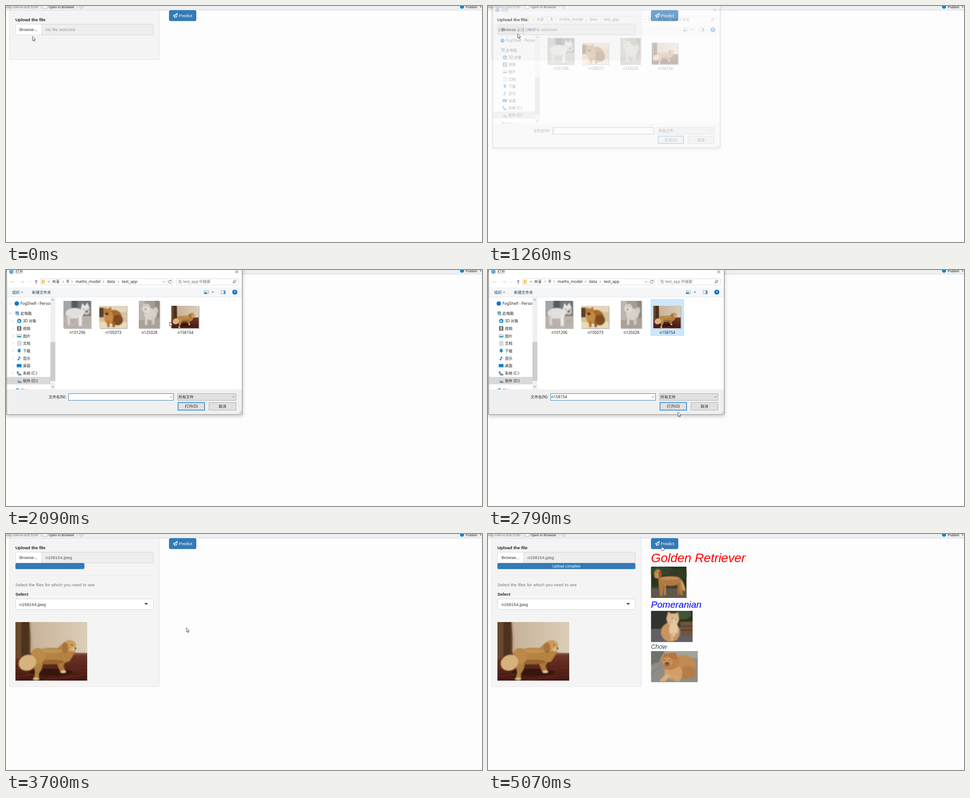
Recreate the animation shown at these times as an HTML page. Size 1061x528 px, loop 9.05 s.

```html
<!DOCTYPE html>
<html lang="en">
<head>
<meta charset="utf-8">
<title>Upload and predict</title>
<style>
html, body { margin: 0; width: 100%; height: 100%; overflow: hidden; background: #fdfdfd }
svg { display: block }
text { font: 9.73px "Liberation Sans", Arial, sans-serif; white-space: pre }
.tiny { font-size: 7.7px }
.bold { font-weight: bold }
#dialog text { font: 8.45px "Noto Sans", "Noto Sans CJK SC", "Noto Sans CJK", sans-serif }
#dialog .latin { font-size: 8.7px }
#frame { filter: drop-shadow(0 3px 4px rgba(0, 0, 0, .25)) }
</style>
</head>
<body>
<svg id="stage" width="1061" height="528" viewBox="0 0 1061 528"></svg>
<script>
const rect = (x, y, w, h, fill, more = '') =>
  `<rect x="${x}" y="${y}" width="${w}" height="${h}" fill="${fill}" ${more}/>`;
const oval = (x, y, rx, ry, fill, more = '') =>
  `<ellipse cx="${x}" cy="${y}" rx="${rx}" ry="${ry}" fill="${fill}" ${more}/>`;
const fillPath = (d, fill, more = '') => `<path d="${d}" fill="${fill}" ${more}/>`;
const line = (d, color = '#555', w = 1) =>
  `<path d="${d}" fill="none" stroke="${color}" stroke-width="${w}"/>`;
const text = (x, y, s, fill = '#333', more = '') =>
  `<text x="${x}" y="${y}" fill="${fill}" ${more}>${s}</text>`;
const group = (id, body) => `<g id="${id}">${body}</g>`;
const right = (x, y, c) => line(`M${x - 1.2} ${y - 2.5}l2.5 2.5-2.5 2.5`, c, .8);
const down = (x, y, c) => line(`M${x - 2.6} ${y - 1.3}l2.6 2.6 2.6-2.6`, c, .8);
const caret = (x, y, r, fill = '#333') => fillPath(`M${x - r} ${y - r / 2}h${2 * r}l${-r} ${r}z`, fill);
// The sharp copy below keeps the edges of the softened picture opaque
const photo = (x, y, w, h, vw, vh, body) =>
  `<svg x="${x}" y="${y}" width="${w}" height="${h}" viewBox="0 0 ${vw} ${vh}" preserveAspectRatio="none">
  ${body}<g filter="url(#soft)">${body}</g></svg>`;

// Simplified pictures
const retriever = rect(0, 0, 160, 131, 'url(#wall)') + rect(0, 0, 34, 84, '#6b492e') +
  rect(13, 0, 17, 85, '#4d301c') + fillPath('M32 0H36L40 70H36z', '#c0a78c') +
  fillPath('M0 84L36 68 160 69V131H0z', 'url(#floor)') +
  line('M0 104L160 84M0 122L160 101M60 131L160 117', '#6a2c21', 1.5) +
  rect(118, 69, 42, 5, '#7d4c36') + oval(80, 112, 48, 8, '#35140f') +
  fillPath('M38 84L64 84 58 106 52 116V129H41L44 112z', '#b08042') +
  fillPath('M88 82L117 78 107 98 112 112 101 114 95 99z', '#ad763a') +
  fillPath('M36 67Q60 55 94 58L108 45Q121 38 131 45L134 66 120 88Q84 98 51 92L35 83z', '#b48243') +
  oval(76, 65, 30, 5, '#c39150') + oval(80, 89, 28, 5, '#95652f') +
  oval(50, 76, 16, 18, '#bb8a49') + oval(27, 91, 20, 17, '#d6b27c', 'transform="rotate(-25 27 91)"') +
  oval(121, 53, 14, 13, '#cc9b5c') + oval(111, 58, 7, 12, '#a8733a') +
  oval(129, 61, 6, 5, '#dbb680') + oval(134, 59, 2, 2, '#30251e') + oval(126, 51, 1.4, 1.4, '#30251e') +
  oval(107, 111, 6, 3, '#e4c38e') + oval(46, 127, 7, 3, '#d9b67c');

const bulldog = rect(0, 0, 61, 61, '#73777a') + rect(0, 0, 17, 38, '#a4a6a5') + rect(19, 0, 13, 32, '#56585b') +
  fillPath('M0 34H61V61H0z', '#bbb3aa') + line('M0 55L30 38M18 61L60 43', '#a09a93') +
  oval(25, 28, 20, 12, '#dfe0df') + rect(9, 32, 6, 22, '#d6d5d2') + rect(34, 31, 7, 25, '#eae9e7') +
  fillPath('M39 18L42 5 48 12 53 4 58 15 57 28 42 30z', '#e6e5e2') + oval(52, 25, 7, 6, '#cdc5c0') +
  oval(52, 24, 2.5, 2, '#353535') + oval(45, 19, 1.2, 1.2, '#333') + oval(55, 19, 1.2, 1.2, '#333');
const pomThumb = rect(0, 0, 61, 50, '#d6c19a') + rect(0, 0, 61, 14, '#e2d7bd') + rect(0, 4, 10, 22, '#5b4026') +
  rect(0, 36, 61, 14, '#eadab7') + oval(33, 25, 17, 16, '#a9682b') + oval(41, 32, 12, 12, '#7d4c24') +
  fillPath('M9 14L12 3 18 7 26 2 29 16 24 24 13 24z', '#ba7832') + oval(21, 27, 10, 14, '#c58a44') +
  rect(17, 34, 6, 14, '#b77733') + rect(29, 36, 6, 12, '#9c6028') + oval(17, 18, 4, 3, '#50321f');
const samoyed = rect(0, 0, 46, 61, '#a49d94') + rect(0, 0, 13, 43, '#bbb5ac') + rect(36, 0, 10, 38, '#8d877f') +
  rect(0, 43, 46, 18, '#aaa198') + oval(26, 30, 14, 13, '#d8d3ca') + oval(17, 17, 9, 10, '#e2ddd4') +
  fillPath('M9 13L10 6 15 9 22 6 25 15z', '#d3ccc2') + rect(14, 32, 5, 22, '#dcd6cc') +
  rect(29, 34, 6, 19, '#d0cabf') + oval(15, 19, 2, 1.5, '#474340') + oval(38, 22, 5, 8, '#d3ccc0');

const standing = rect(0, 0, 79, 70, '#27341e') + oval(20, 10, 32, 10, '#35442a') + oval(61, 18, 22, 12, '#303b25') +
  rect(0, 44, 79, 9, '#404331') + rect(0, 49, 79, 21, '#5e584a') +
  fillPath('M65 27Q75 36 76 55L70 52 62 39z', '#cf9f68') +
  fillPath('M16 24L58 23Q68 27 67 39L71 64H66L59 41Q42 45 29 41L25 66H20L17 40z', '#b1783f') +
  oval(42, 26, 22, 4, '#c48d52') + rect(29, 39, 4, 25, '#bd8650') + rect(59, 38, 4, 25, '#a56b38') +
  oval(15, 16, 8, 10, '#bd8347') + oval(20, 18, 3.5, 8, '#94572a') + oval(12, 21, 4.5, 4.5, '#d0a06b') +
  oval(11, 21, 1.6, 1.3, '#2d2722');
const pomeranian = rect(0, 0, 92, 69, '#3b3b39') + rect(0, 37, 92, 32, '#626166') + rect(0, 0, 38, 40, '#30302e') +
  rect(63, 0, 29, 29, '#26341f') + oval(71, 8, 18, 11, '#435433') + fillPath('M64 24H92V55H68z', '#70543a') +
  line('M65 34H92M66 43H92', '#46362b', 2) + oval(43, 47, 21, 21, '#c9965f') +
  fillPath('M34 17L38 2 47 8 60 4 62 19 58 30 38 31z', '#d8b283') + oval(48, 19, 13, 13, '#dcb788') +
  oval(50, 41, 10, 16, '#e4c8a1') + rect(44, 49, 5, 17, '#dab486') + rect(53, 50, 5, 15, '#c9995f') +
  oval(54, 21, 5, 4, '#e9d5b8') + oval(55, 20, 1.8, 1.4, '#2e2925') + oval(48, 16, 1.2, 1.2, '#2e2925');
const chow = rect(0, 0, 104, 69, '#8e8d86') + rect(0, 0, 104, 16, '#a3a199') + fillPath('M0 0H30L17 24 0 31z', '#6e7267') +
  line('M0 48L27 32M24 24L0 57', '#7a7972') + oval(72, 32, 27, 23, '#c08a55') + oval(82, 48, 18, 14, '#b67b45') +
  oval(50, 47, 20, 16, '#d0a06c') + oval(43, 23, 20, 19, '#c08148') +
  fillPath('M27 13L29 4 37 7 49 3 57 6 59 19z', '#b5743a') + oval(37, 24, 11, 11, '#cc935a') +
  oval(36, 29, 6, 5, '#84603f') + oval(35, 26, 2.6, 1.8, '#292421') + oval(30, 20, 1.3, 1, '#292421') +
  oval(42, 20, 1.3, 1, '#292421') + fillPath('M33 51L44 54 31 67H18z', '#dcb07c') +
  fillPath('M54 53L69 55 64 67H51z', '#d5a168');

// Web page
const tiny = (x, s, fill = '#222') => text(x, 5, s, fill, 'class="tiny"');
const toolbar = rect(0, 0, 1061, 9, '#eceef1') + rect(0, 9, 1061, 1, '#d8dbdf') +
  tiny(0, 'http://demo.test:5290', '#777') + tiny(95, 'Open in Browser') + tiny(1025, 'Publish') +
  line('M77.5 0V6M158.5 0V6', '#c3c5c8') + rect(82.5, -3, 9, 8, '#fff', 'stroke="#9aa0a6" stroke-width=".8"') +
  oval(168, 2, 4.2, 4.2, '#e5e7e9', 'stroke="#bbbec2" stroke-width=".8"') + oval(168, 2, 1.5, 1.5, '#c5c8cc') +
  oval(1016.5, 1.5, 4.6, 4.6, '#1c7fc0') + caret(1058, 2.5, 2);

const box = (x, y, w, h, fill, edge, more = '') =>
  rect(x, y, w, h, fill, `rx="2.8" stroke="${edge}" stroke-width=".8" ${more}`);
const uploaded = line('M21 93H328.5', '#ebebeb') +
  text(21, 117.2, 'Select the files for which you need to see', '#777') +
  text(21, 138.2, 'Select', '#222', 'class="bold"') + box(21.3, 145.4, 307, 23.4, '#fff', '#ccc') +
  text(30, 160.5, 'n158154.jpeg') + caret(312.5, 156.5, 4) + photo(21, 197, 160, 131, 160, 131, retriever);

const italic = (y, size, s, fill) => text(363.3, y, s, fill, `style="font-size:${size}px;font-style:italic"`);
const results = italic(63, 27.9, 'Golden Retriever', '#f00') + photo(363.5, 73, 79, 70, 79, 70, standing) +
  italic(164.9, 20.9, 'Pomeranian', '#00f') + photo(363.5, 172, 92.5, 69.5, 92, 69, pomeranian) +
  italic(256.6, 13.9, 'Chow', '#2f4f4f') + photo(363.5, 262, 104, 69.5, 104, 69, chow);

const page = toolbar + box(7.4, 9.8, 334.8, 110.4, '#f4f4f4', '#e3e3e3', 'id="panel"') +
  text(21, 33.6, 'Upload the file', '#222', 'class="bold"') + box(21.3, 40.8, 307, 23.8, '#eee', '#ccc') +
  fillPath('M79.5 41.2H24a2.5 2.5 0 0 0-2.4 2.5V62a2.5 2.5 0 0 0 2.4 2.3H79.5z', '#fff', 'id="browse"') +
  line('M79.5 41V64.5', '#ccc', .8) + text(30, 56, 'Browse...') + text(88, 56, '', '#999', 'id="file"') +
  rect(21, 65, 0, 13.6, '#337ab7', 'id="bar" rx="2.8"') +
  text(174.8, 74.8, 'Upload complete', '#fff', 'id="done" text-anchor="middle" style="font-size:8.34px"') +
  group('uploaded', uploaded) + box(363.8, 9.8, 60, 23.4, '#337ab7', '#2e6da4', 'id="predict"') +
  line('M372.8 22L382 16.4 380.4 25.2 377.5 23.8 375.7 26.2 375.4 23.1zM375.4 23.1L382 16.4', '#fff', 1.1) +
  text(385, 24.8, 'Predict', '#fff') + group('results', results);

// File dialog
const latin = (x, y, s, fill = '#222', more = '') => text(x, y, s, fill, 'class="latin" ' + more);
const places = ['3D 对象', '视频', '图片', '文档', '下载', '音乐', '桌面', '系统 (C:)', '软件 (D:)'];
const rowY = i => 114 + i * 16.7;
const drive = y => fillPath(`M24 ${y}h7l3.5 2.5v2h-7z`, '#9b9fa3') + line(`M27 ${y + 4}h7`, '#444');
const icons = [
  y => fillPath(`M25 ${y - 3}l5-2 4 2v6l-4 2-5-2z`, '#1688d3') + fillPath(`M27 ${y - 1}l4-1v5l-4-1z`, '#bde9fb'),
  y => rect(25, y - 5, 9, 10, '#555') + rect(27.5, y - 4, 4, 8, '#b6c9d5'),
  y => rect(24.5, y - 3.5, 10, 7, '#e9f4fa', 'stroke="#999" stroke-width=".7"') + rect(25.5, y, 8, 3, '#4496bc'),
  y => rect(26, y - 4.5, 7.5, 9, '#fff', 'stroke="#8b9baa" stroke-width=".8"') +
    line(`M27.5 ${y - 2}h4.5m-4.5 2h4.5m-4.5 2h4.5`, '#67a0c8', .8),
  y => fillPath(`M27 ${y - 4.5}h5v4h2.5l-5 5-5-5H27z`, '#2086d5'),
  y => line(`M29 ${y + 3}v-7q1 3 4 4`, '#1b83d1', 1.3) + oval(27.7, y + 3, 2, 1.6, '#1b83d1'),
  y => rect(24, y - 3.8, 10.5, 7.5, '#0b7bd0') + rect(25, y + 2, 8.5, 1, '#5eb9ef'),
  y => rect(24, y - 4, 4, 4, '#1a9be8') + drive(y),
  drive
];
const tree = rect(2, 239.2, 97, 16.6, '#d9d9d9') + oval(24, 75, 5, 5, '#0f78d0') + latin(32, 78, 'FogShelf - Personal') +
  rect(21.5, 93, 7, 5.5, '#56afe0', 'stroke="#788895" stroke-width=".7"') + line('M23 101l7-1', '#888', 1.3) +
  text(32, 100.3, '此电脑', '#222') +
  places.map((s, i) => icons[i](rowY(i)) + text(37.7, rowY(i) + 3.2, s, '#222')).join('') +
  rect(22, 265, 7, 5, '#4a9fd8') + text(32, 272.5, '网络', '#222') +
  group('arrows', right(9.5, 75, '#aaa') + down(9.5, 97, '#888') + places.map((s, i) => right(15, rowY(i), '#bbb')).join(''));

const files = [
  [128, 69, 61, 61, bulldog, 'n101296', 159.3], [208, 80, 61, 50, pomThumb, 'n105073', 239.6],
  [296, 69, 46, 61, samoyed, 'n125028', 319.8], [368.5, 80, 61, 50, retriever, 'n158154', 399.9]
].map(([x, y, w, h, art, name, cx], i) => rect(x + 1, y + 1, w + .8, h + .8, '#bbb') +
  photo(x, y, w, h, i > 2 ? 160 : w, i > 2 ? 131 : h, art) + latin(cx, 142.8, name, '#222', 'text-anchor="middle"')).join('');

const field = (x, y, w, h, fill, edge, more = '') => rect(x + .5, y + .5, w - 1, h - 1, fill, `stroke="${edge}" ${more}`);
const address = field(77, 19, 295, 15, '#fff', '#d9d9d9') + field(379, 19, 140, 15, '#fff', '#d9d9d9') +
  line('M359.5 20V33', '#e2e2e2') + rect(80, 22, 6.5, 8.5, '#f8d775') + rect(80, 22, 2, 8.5, '#e7b945') +
  line('M95 24l-2 2 2 2m2.8-4l-2 2 2 2', '#555', .8) + text(102.8, 29.3, '共享', '#222') +
  [[135, 'R'], [155, 'maths_model'], [225, 'data'], [258, 'test_app']]
    .map(([x, s]) => right(x - 7.8, 26, '#555') + latin(x, 29, s)).join('') +
  down(352, 26.5, '#444') + line('M367.5 24.3A3.3 3.3 0 1 0 368.3 27M368 22v2.8h-2.8', '#555', .9) +
  text(384, 29.3, '在 test_app 中搜索', '#707070') + oval(510, 25.3, 2.4, 2.4, 'none', 'stroke="#444" stroke-width=".9"') +
  line('M508.3 27L505.8 29.6', '#444', 1.1) +
  line('M19 26.5H11m3.2-3l-3 3 3 3M32 26.5h8m-3.2-3l3 3-3 3', '#ccc', .9) + down(53, 26.5, '#ccc') +
  line('M67.3 30.8V23m-3 3l3-3 3 3', '#444', 1);

const dialog = group('frame', rect(1.5, -8, 525, 331, '#fff', 'stroke="#777"')) +
  oval(12, 4, 5, 5, '#6fa6d9', 'id="appIcon"') + text(21, 7.2, '打开', '#222', 'id="title"') +
  line('M511 .7l6.8 6.8m0-6.8l-6.8 6.8', '#333', .9) + address +
  rect(2, 39, 524, 22, '#f5f6f7') + line('M2 60.5H526', '#e6e8ea') + text(13.8, 52.7, '组织', '#1c3c5c') + caret(36, 50, 2) +
  text(58, 52.7, '新建文件夹', '#1c3c5c') + rect(441.5, 46, 10, 7.5, '#d8ebf4', 'stroke="#8b9aa5" stroke-width=".7"') +
  rect(442, 50, 6, 3, '#3b7f9b') + caret(461, 49.8, 2.2) +
  rect(479.5, 46, 9.5, 7.5, '#fff', 'stroke="#7594ad" stroke-width=".8"') +
  rect(485, 46, 4, 7.5, '#4f9cd2') + oval(510, 49.5, 5.6, 5.6, '#0c70be') +
  text(510, 52.6, '?', '#fff', 'text-anchor="middle" style="font-weight:bold"') +
  `<g clip-path="url(#nav)">${tree}</g>` + rect(99, 61, 11, 206, '#f0f0f0') + rect(99, 161, 11, 87, '#cdcdcd') +
  line('M101.7 68l2.6-2.6 2.6 2.6', '#444', 1) + down(104.3, 261, '#444') +
  rect(363.4, 65.9, 72.8, 80.8, '#cce8ff', 'id="pick" stroke="#99d1ff" stroke-width=".8"') + files +
  rect(2, 267, 524, 55.5, '#f0f0f0') + text(95, 287.2, '文件名(N):', '#222') + field(139, 276, 235, 16, '#fff', '#3c7fb1') +
  rect(140.8, 279, 36.5, 10, '#0078d7', 'id="mark"') + latin(141, 287, 'n158154', '#222', 'id="name"') +
  rect(142, 278.5, .8, 10, '#333', 'id="caret"') + down(368, 283.8, '#555') +
  field(382, 276, 131, 16, '#e1e1e1', '#adadad') + text(384.5, 287.2, '所有文件', '#222') + down(507, 283.8, '#555') +
  field(383, 296, 60, 18, '#e1e1e1', '#0078d7', 'id="open" stroke-width="1.4"') +
  text(413, 308.2, '打开(O)', '#222', 'text-anchor="middle"') +
  field(452, 296, 61, 18, '#e1e1e1', '#adadad') + text(482.5, 308.2, '取消', '#222', 'text-anchor="middle"') +
  line('M519 320.5h6M521 318.5h4M523 316.5h2', '#b4b4b4', 1);

const outline = 'stroke="#222" stroke-width=".8"';
const arrow = fillPath('M0 0V9.6L2.2 7.6 3.8 11 5.3 10.4 3.8 7.1H6.8z', '#fff', 'id="arrow" ' + outline);
const hand = fillPath('M-1 7V.9a.9.9 0 0 1 1.8 0V5l3.4.8q1.2.4 1 1.6L4.6 12H.2L-2.6 8.2q-.2-1.6 1.6-.6z',
  '#fff', 'id="hand" ' + outline);

const gradient = (id, a, b, more = '') => `<linearGradient id="${id}" ${more}>
  <stop offset=".2" stop-color="${a}"/><stop offset="1" stop-color="${b}"/></linearGradient>`;
stage.innerHTML = '<defs>' + gradient('wall', '#c7b299', '#dccdb9') +
  gradient('floor', '#6a3025', '#431810', 'x2="0" y2="1"') +
  `<filter id="soft"><feGaussianBlur stdDeviation="1.1"/></filter>
  <clipPath id="nav"><path d="M2 61H99V267H2z"/></clipPath></defs>` +
  page + group('dialog', dialog) + group('pointer', arrow + hand);

const $ = id => document.getElementById(id);
const set = (id, key, value) => $(id).setAttribute(key, value);
const show = (id, on) => set(id, 'visibility', on ? 'visible' : 'hidden');
const clamp = v => Math.max(0, Math.min(1, v));
const ramp = (t, a, b) => clamp((t - a) / (b - a));

// Pointer stops: time, x, y
const path = [[0, 59, 68], [450, 59, 68], [1060, 66, 62], [1320, 66, 62], [2090, 365, 116], [2370, 396, 118],
  [2510, 397, 119], [2790, 423.3, 318], [3140, 413.7, 305.5], [3490, 413.7, 305.5], [3980, 384, 62],
  [4470, 386, 25], [5069, 386, 25], [5070, 387.5, 25], [9050, 387.5, 25]];

function pointerAt(t) {
  const i = path.findIndex(p => p[0] > t), [t0, x0, y0] = path[i - 1], [t1, x1, y1] = path[i];
  const u = ramp(t, t0, t1), k = u * u * (3 - 2 * u);
  return [x0 + (x1 - x0) * k, y0 + (y1 - y0) * k];
}

function draw(now) {
  const t = now % 9050;
  const q = t >= 1260 && t < 4540 ? 1250 + 70 * Math.floor((t - 1250) / 70) : t; // motion advances in 70 ms steps
  const [x, y] = pointerAt(q);
  const closing = q >= 3350, picked = q >= 2440;
  const level = t < 1260 ? 0 : closing ? clamp(1 - (q - 3280) / 200) : clamp(.3 + (q - 1250) / 200);
  const scale = .95 + .05 * level;

  set('dialog', 'opacity', level);
  set('dialog', 'transform', `translate(264 146) scale(${scale}) translate(-264 -146)`);
  show('dialog', level > 0);
  show('appIcon', level > 0 && !closing);
  set('title', 'x', closing ? 6 : 21);
  set('arrows', 'opacity', ramp(q, 1390, 1600) * (1 - ramp(q, 2230, 2580)));
  set('pick', 'fill', closing ? '#d9d9d9' : picked ? '#cce8ff' : '#e5f3ff');
  set('pick', 'stroke', closing ? '#d9d9d9' : picked ? '#99d1ff' : '#e5f3ff');
  set('pick', 'opacity', ramp(q, 2090, 2300));
  set('name', 'fill', closing ? '#fff' : '#222');
  set('name', 'opacity', +picked);
  set('mark', 'opacity', +closing);
  set('caret', 'opacity', +(q < 1800));
  set('open', 'fill', q >= 3070 ? '#e5f1fb' : '#e1e1e1');

  set('browse', 'fill', t >= 590 && q < 3490 ? '#e6e6e6' : '#fff');
  $('file').textContent = closing ? 'n158154.jpeg' : 'No file selected';
  set('file', 'fill', closing ? '#555' : '#999');
  set('bar', 'width', 307.5 * ramp(q, 3490, 3910));
  show('done', q >= 4050);
  show('uploaded', q >= 3700);
  set('panel', 'height', q >= 3700 ? 332 : 110.4);
  set('predict', 'fill', t >= 4800 && t < 4870 ? '#286090' : '#337ab7');
  show('results', t >= 5070);

  const onButton = q > 4050 && y < 34;
  set('pointer', 'transform', `translate(${x} ${y})`);
  show('arrow', !onButton);
  show('hand', onButton);
}

const start = performance.now();
function tick() {
  draw(performance.now() - start);
  requestAnimationFrame(tick);
}
draw(0);
requestAnimationFrame(tick);
</script>
</body>
</html>
```
